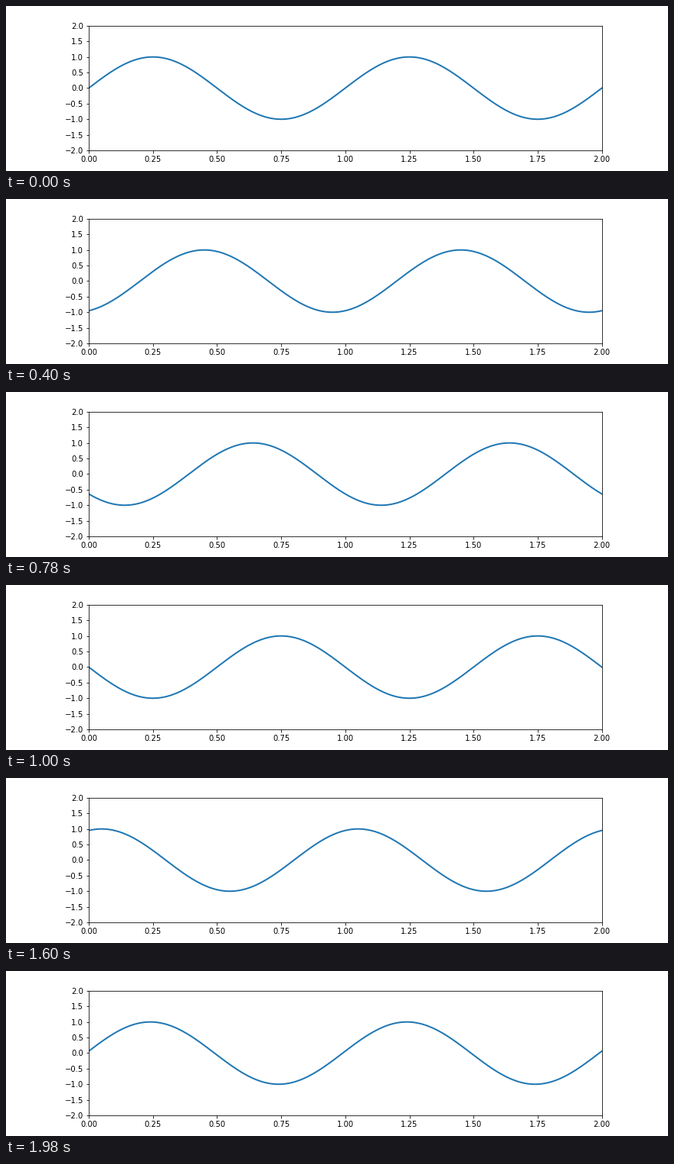
A matplotlib script that plays this animation: 864x216 px, repeating every 2000 ms.

```python
import numpy as np
import matplotlib.pyplot as plt
from matplotlib.animation import FuncAnimation

FRAMES = 100
INTERVAL = 20  # ms

plt.rcParams["font.family"] = "DejaVu Sans"
plt.rcParams["font.size"] = 10

fig, ax = plt.subplots(figsize=(12, 3), dpi=72, facecolor="white")
fig.subplots_adjust(left=0.125, right=0.9, bottom=0.125, top=0.88)
ax.set_xlim(0, 2)
ax.set_ylim(-2, 2)
ax.set_xticks(np.arange(0, 2.01, 0.25))
ax.set_yticks(np.arange(-2, 2.01, 0.5))

x = np.linspace(0, 2, 1000)
line, = ax.plot(x, np.sin(2 * np.pi * x), color="#1f77b4", lw=2)


def update(i):
    # The wave travels right by one full period per loop.
    line.set_ydata(np.sin(2 * np.pi * (x - i / FRAMES)))
    return line,


anim = FuncAnimation(fig, update, frames=FRAMES, interval=INTERVAL,
                     repeat=True, repeat_delay=0)
plt.show()
```
